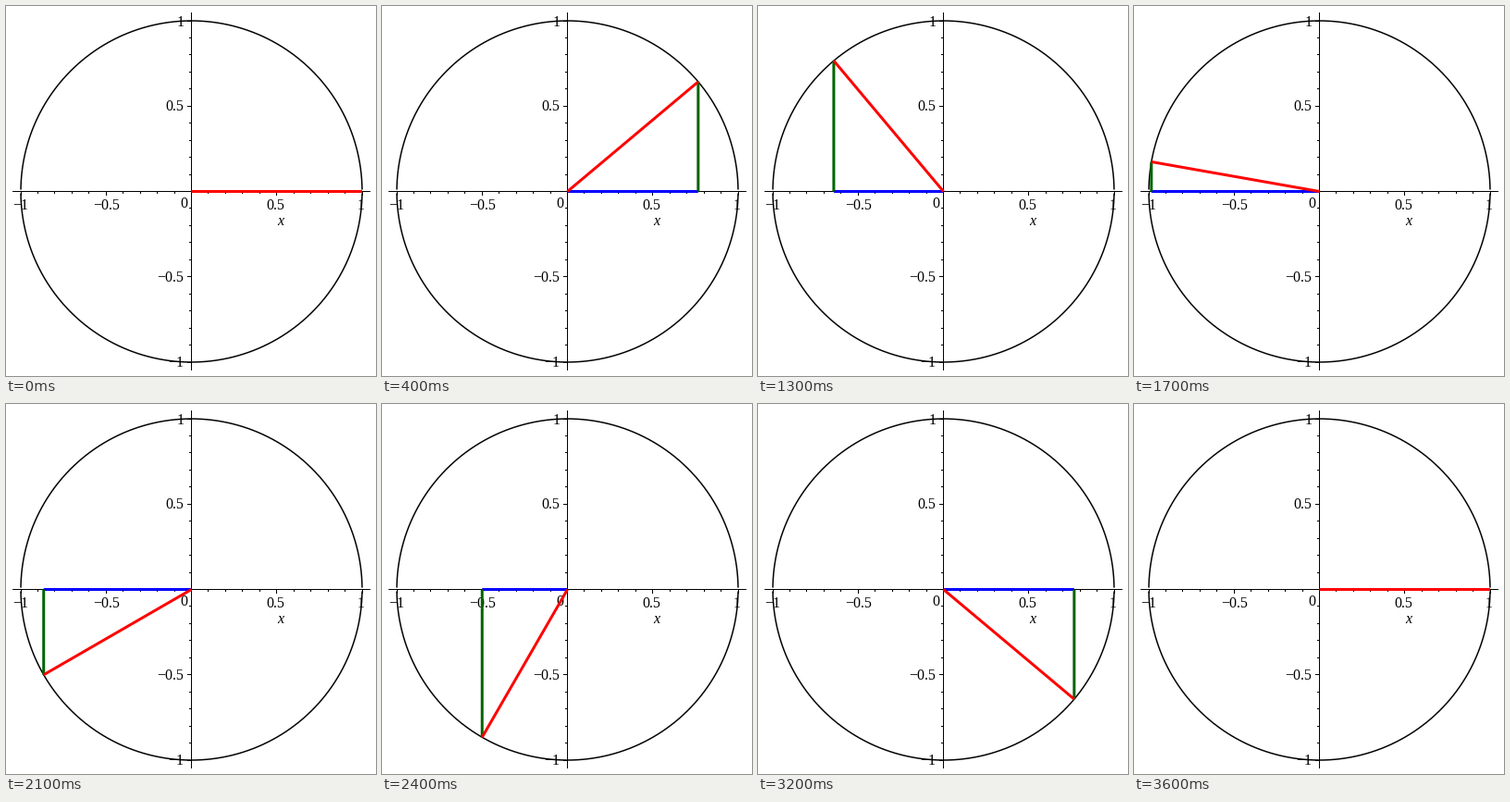
Recreate the animation shown at these times as a matplotlib script. Size 400 px wide and 400 px high, loop 3700 ms.

```python
import numpy as np
import matplotlib.pyplot as plt
from matplotlib.animation import FuncAnimation

SIZE, DPI = 400, 100
C, R = 200.5, 184.5        # origin and unit length in pixels
FRAMES, STEP_MS = 37, 100
PX = 72 / DPI              # points per pixel

fig = plt.figure(figsize=(SIZE / DPI, SIZE / DPI), dpi=DPI, facecolor="white")
ax = fig.add_axes([0, 0, 1, 1])
ax.set(xlim=(0, SIZE), ylim=(SIZE, 0))
ax.axis("off")


def line(xs, ys, color="black", width=1.0, z=1):
    return ax.plot(xs, ys, color=color, lw=width * PX, zorder=z, snap=False,
                   solid_capstyle="butt")[0]


def label(x, y, text, **kw):
    ax.text(x, y, text.replace("-", "\u2212"), fontsize=16 * PX,
            family="Liberation Serif", ha="center", va="baseline",
            zorder=2, **kw)


def draw_axes():
    line([7, 394], [C, C])
    line([C, C], [7, 394])
    for k in range(-10, 11):
        p = np.floor(C + k * R / 10) + 0.5
        end = 0.5 + (4 if k % 5 == 0 else 2)
        line([p, p], [C, C + end])
        line([C - end, C], [p, p])

    for x, text in [(15.5, "-1"), (108.5, "-0.5"), (291.5, "0.5"), (384, "1")]:
        label(x, 220, text)
    for x, y, text in [(188.5, 22, "1"), (182.5, 113, "0.5"),
                       (177.5, 298, "-0.5"), (184, 390, "-1")]:
        label(x, y, text)
    label(192, 218, "0")
    label(296.5, 237, "x", style="italic")


def draw_circle():
    gap = np.radians(0.6)
    t = np.linspace(gap, np.pi - gap, 300)
    for side in (1, -1):
        line(C + R * np.cos(t), C - side * R * np.sin(t), width=1.5, z=3)


draw_axes()
draw_circle()
cosine = line([], [], "#0000ff", 3, 4)
sine = line([], [], "#006400", 3, 5)
radius = line([], [], "#ff0000", 3, 6)


def update(i):
    a = 2 * np.pi * i / (FRAMES - 1)
    x, y = C + R * np.cos(a), C - R * np.sin(a)
    cosine.set_data([C, x], [C, C])
    sine.set_data([x, x], [C, y])
    radius.set_data([C, x], [C, y])
    return cosine, sine, radius


anim = FuncAnimation(fig, update, frames=FRAMES, interval=STEP_MS,
                     repeat=True, repeat_delay=0, blit=False)
plt.show()
```
